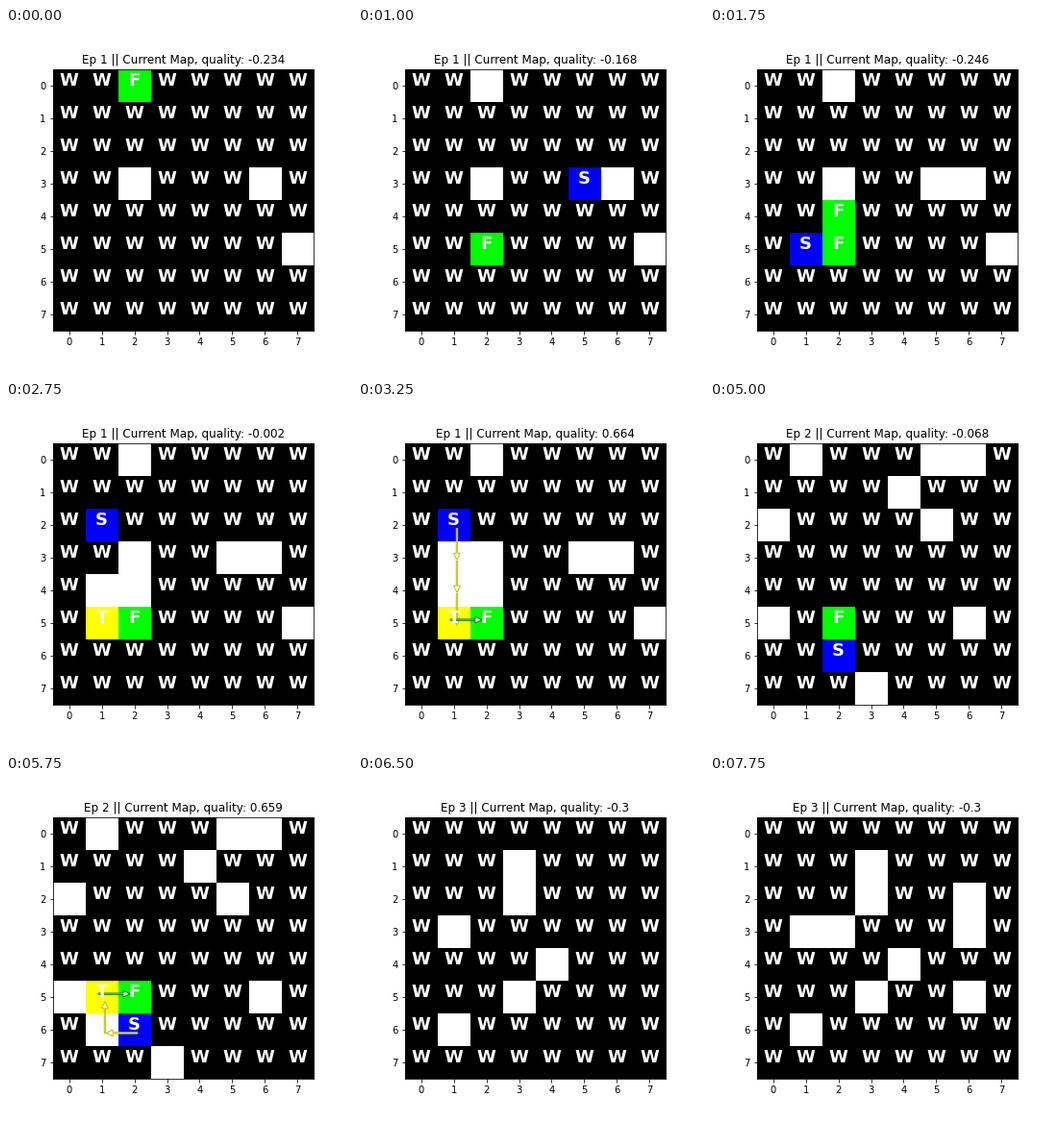
A matplotlib script for the animation above (8 s loop, 360x360 px).

```python
import numpy as np
import matplotlib.pyplot as plt
from matplotlib.animation import FuncAnimation

N, FRAMES, INTERVAL = 8, 32, 250
COLORS = {"W": (0, 0, 0), ".": (255, 255, 255), "F": (0, 255, 0),
          "S": (0, 0, 255), "T": (255, 255, 0)}
IDLE, HOLD = 2, 3  # steps before the first edit and after the last one

# Each episode: tiles of the starting map, then one edit per step.
EPISODES = [
    ({(0, 2): "F", (3, 2): ".", (3, 6): ".", (5, 7): "."},
     [(0, 2, "."), (3, 5, "S"), (5, 2, "F"), (3, 5, "."), (5, 1, "S"), (4, 2, "F"),
      (4, 1, "."), (4, 2, "."), (5, 1, "T"), (2, 1, "S"), (3, 1, ".")]),
    (dict.fromkeys([(0, 1), (0, 5), (0, 6), (1, 4), (2, 0), (2, 5), (5, 0),
                    (6, 2), (7, 3)], "."),
     [(5, 6, "."), (6, 2, "S"), (5, 2, "F"), (5, 1, "T"), (6, 1, ".")]),
    (dict.fromkeys([(1, 3), (2, 3), (3, 1), (4, 4), (5, 3), (6, 1)], "."),
     [(5, 6, "."), (2, 6, "."), (3, 2, "."), (3, 6, ".")]),
]


def find_path(tiles, start, goal):
    """Shortest list of cells from start to goal over open floor, or []."""
    paths, seen = [[start]], {start}
    for path in paths:
        r, c = path[-1]
        for cell in ((r + 1, c), (r - 1, c), (r, c + 1), (r, c - 1)):
            if cell == goal:
                return path + [cell]
            if cell not in seen and tiles.get(cell) == ".":
                seen.add(cell)
                paths.append(path + [cell])
    return []


def evaluate(tiles):
    """Quality of a map and its two routes, start-treasure and treasure-finish."""
    spots = {k: [cell for cell, t in tiles.items() if t == k] for k in "STF"}
    single = {k: v[0] for k, v in spots.items() if len(v) == 1}
    quality = -0.3 + 0.066 * len(single)
    quality -= 0.012 * sum(max(len(v) - 1, 0) for v in spots.values())

    def link(a, b):
        return find_path(tiles, single[a], single[b]) if {a, b} <= set(single) else []

    routes = [link("S", "T"), link("T", "F")]
    if all(routes):
        steps = sum(len(route) - 1 for route in routes)
        return 0.644 + 0.005 * steps, routes
    if any(routes) or link("S", "F"):
        quality += 0.1
    return quality, []


def state_at(step):
    """Episode index, tiles and number of steps since the last edit."""
    for index, (start, edits) in enumerate(EPISODES):
        length = IDLE + len(edits) + HOLD
        if step < length:
            break
        step -= length
    done = max(step - IDLE + 1, 0)
    tiles = dict(start)
    for r, c, tile in edits[:done]:
        tiles[r, c] = tile
    return index, tiles, done - len(edits)


fig, ax = plt.subplots(figsize=(5, 5), dpi=72, facecolor="white")
fig.subplots_adjust(left=0.125, right=0.9, bottom=0.125, top=0.88)
image = ax.imshow(np.zeros((N, N, 3), np.uint8), interpolation="nearest")
ax.set_xticks(range(N))
ax.set_yticks(range(N))
title = ax.set_title("", fontsize=12)
labels = {(r, c): ax.text(c, r, "", color="white", fontsize=18, weight="bold",
                          ha="center")
          for r in range(N) for c in range(N)}
arrows = []


def draw_route(cells, shift, edge):
    for (r0, c0), (r1, c1) in zip(cells, cells[1:]):
        arrows.append(ax.arrow(
            c0 + shift, r0 + shift, 0.96 * (c1 - c0), 0.96 * (r1 - r0),
            width=0.04, head_width=0.2, head_length=0.2,
            length_includes_head=True, fc="white", ec=edge, lw=1))


def draw(step):
    index, tiles, waited = state_at(step)
    quality, routes = evaluate(tiles)
    title.set_text(f"Ep {index + 1} || Current Map, quality: {round(quality, 3)}")

    pixels = np.zeros((N, N, 3), np.uint8)
    for cell, label in labels.items():
        tile = tiles.get(cell, "W")
        pixels[cell] = COLORS[tile]
        label.set_text(tile.replace(".", ""))
    image.set_data(pixels)

    while arrows:
        arrows.pop().remove()
    if routes and waited > 0:
        draw_route(routes[0], 0.1, "y")
        draw_route(routes[1], -0.1, "g")
    return []


anim = FuncAnimation(fig, draw, frames=FRAMES, interval=INTERVAL,
                     init_func=lambda: draw(0), repeat=True, repeat_delay=0)
plt.show()
```
